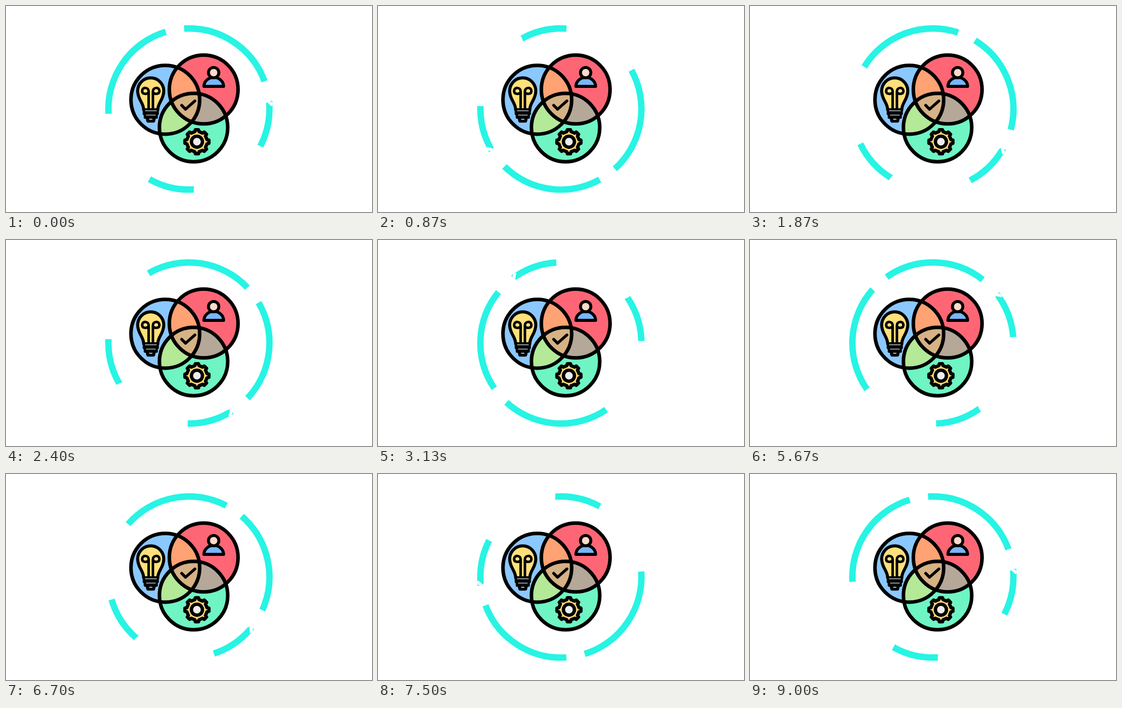
Recreate the animation shown at these times as an HTML page. Size 720x405 px, loop 9.03 s.

```html
<!DOCTYPE html>
<html lang="en">
<head>
<meta charset="utf-8">
<title>Venn diagram with rotating ring</title>
<style>
  html, body { margin: 0; width: 100%; height: 100%; overflow: hidden; background: #fff; }
  svg { display: block; width: 100vw; height: 100vh; }
  .ink { stroke: #000; stroke-linecap: round; stroke-linejoin: round; }
</style>
</head>
<body>
<svg viewBox="0 0 720 405">
  <defs>
    <circle id="idea" cx="313.4" cy="184.3" r="67.6"/>
    <circle id="user" cx="388.9" cy="164.2" r="67.6"/>
    <circle id="work" cx="369" cy="239" r="67.2"/>
    <clipPath id="inIdea"><use href="#idea"/></clipPath>
    <clipPath id="inUser"><use href="#user"/></clipPath>
  </defs>

  <g id="ring">
    <circle cx="359.8" cy="202.5" r="158.4" fill="none" stroke="#27f4e4" stroke-width="12.6"
      pathLength="360" stroke-dasharray="73.3 16.7 30.9 59.1 32.8 57.2 76.7 13.3"
      transform="rotate(-93.4 359.8 202.5)"/>
  </g>

  <use href="#idea" fill="#8bc8ff"/>
  <use href="#user" fill="#ff6675"/>
  <use href="#work" fill="#6ef5c3"/>
  <g clip-path="url(#inIdea)">
    <use href="#user" fill="#ffa274"/>
    <use href="#work" fill="#b4e998"/>
  </g>
  <g clip-path="url(#inUser)">
    <use href="#work" fill="#b5a898"/>
    <g clip-path="url(#inIdea)"><use href="#work" fill="#d6b284"/></g>
  </g>
  <g class="ink" fill="none" stroke-width="7">
    <use href="#idea"/>
    <use href="#user"/>
    <use href="#work"/>
    <path d="M345.6 195.2L353.2 203L371.6 186.6" stroke-width="5.6"/>
  </g>

  <!-- light bulb -->
  <g class="ink" fill="none" stroke-width="6">
    <path fill="#ffe07a" d="M270.8 204C270.8 190 259 184 259 167A25.7 25.7 0 0 1 310.4 167C310.4 184 298.6 190 298.6 204Z"/>
    <path stroke-width="5" d="M280.6 202V168C280.6 159 267.8 159 267.8 167C267.8 174 277 174 280.6 170M289 202V168C289 159 301.8 159 301.8 167C301.8 174 292.6 174 289 170"/>
    <path fill="#000" stroke-width="5.4" d="M271.6 205.5H298V212H296V219H292.3L290.6 226.5H278.8L277.2 219H273.6V212H271.6Z"/>
    <path stroke="#b9cbd6" stroke-width="1.3" d="M274 206H296M276 214.5H294"/>
    <path stroke="#78a7d2" stroke-width="2.4" d="M282.5 222.8H287"/>
  </g>

  <!-- person -->
  <g class="ink" stroke-width="5.8">
    <path fill="#78b6fb" d="M389.3 158A19.4 17.6 0 0 1 428.1 158Z"/>
    <circle cx="408.5" cy="131" r="10.2" fill="#fcdcc8"/>
  </g>

  <!-- gear -->
  <g class="ink" stroke-width="6.6">
    <path id="gear" fill="#ffdc72"/>
    <circle cx="375.6" cy="266.8" r="10.8" fill="#eeeef0"/>
  </g>
</svg>
<script>
  const LOOP = 9030, FPS = 30, CYCLE = 136;
  const REST = 753.8, FULL = 1440;
  const ring = document.getElementById('ring');

  const easeSine = u => (1 - Math.cos(Math.PI * u)) / 2;
  // Cubic in and out, with the fastest point at u = m.
  const easeCubic = (u, m) => u < m ? u ** 3 / m ** 2 : 1 - (1 - u) ** 3 / (1 - m) ** 2;

  function angleAt(step) {
    if (step <= 42) return REST * easeSine(step / 42);
    if (step < 56) return REST;
    return REST + (FULL - REST) * easeCubic((step - 47.8) / 87.6, 0.7);
  }

  function gearPath(cx, cy, teeth) {
    const points = [];
    for (let i = 0; i < teeth; i++) {
      for (const [offset, radius] of [[-0.26, 20.2], [-0.17, 23.8], [0.17, 23.8], [0.26, 20.2]]) {
        const a = (i + offset) * 2 * Math.PI / teeth;
        points.push((cx + radius * Math.sin(a)).toFixed(2) + ' ' + (cy - radius * Math.cos(a)).toFixed(2));
      }
    }
    return 'M' + points.join('L') + 'Z';
  }

  function draw(ms) {
    const step = Math.floor((ms % LOOP + 4) * FPS / 1000) % CYCLE;
    ring.setAttribute('transform', `rotate(${angleAt(step)} 359.8 202.5)`);
  }

  document.getElementById('gear').setAttribute('d', gearPath(375.6, 266.8, 8));
  const start = performance.now();
  function tick() {
    draw(performance.now() - start);
    requestAnimationFrame(tick);
  }
  draw(0);
  requestAnimationFrame(tick);
</script>
</body>
</html>
```
